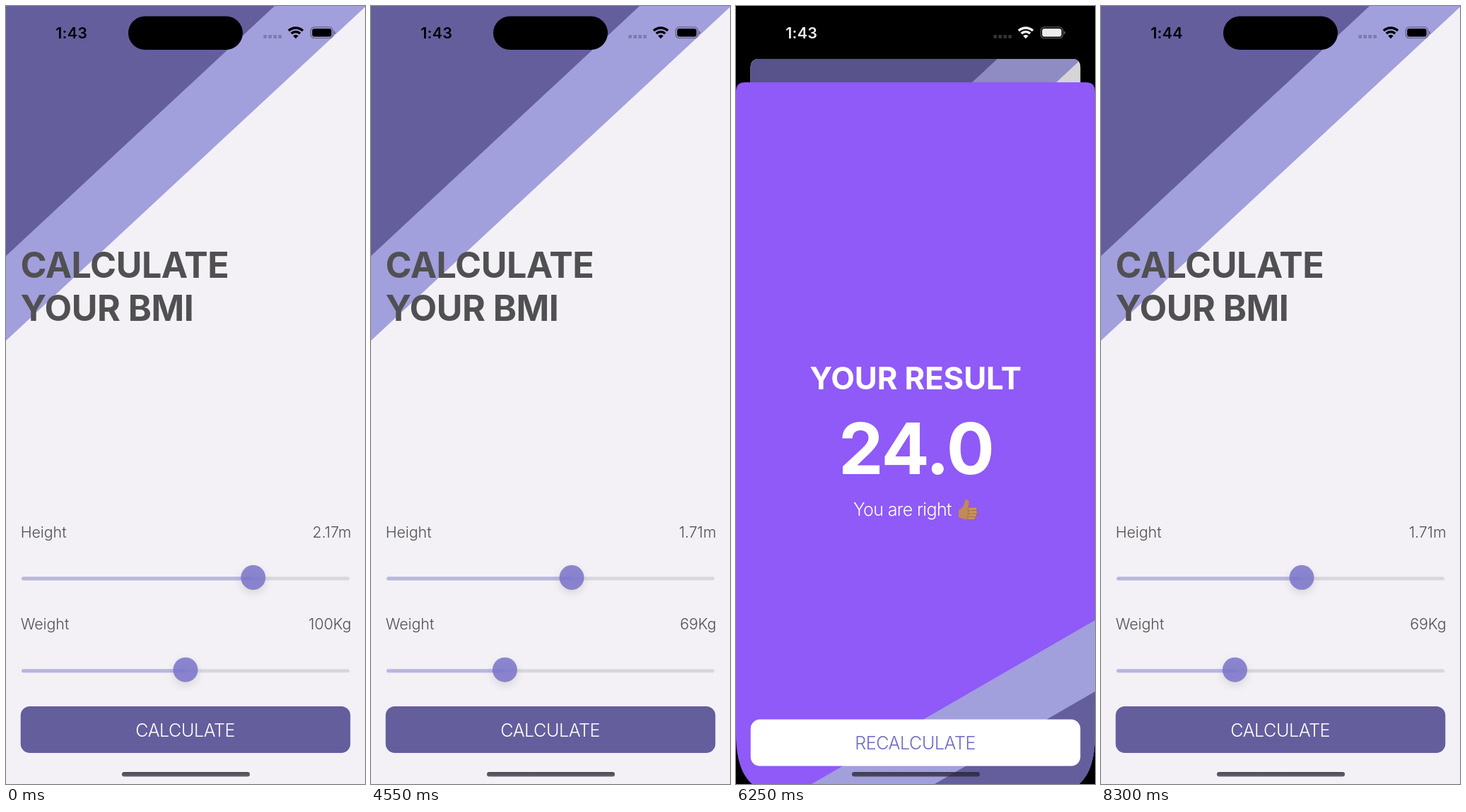
Animation, 508 px wide and 1102 px high, one loop 8.35 s. Source, as an HTML page:

```html
<!DOCTYPE html>
<html lang="en">
<head>
<meta charset="utf-8">
<title>BMI calculator</title>
<style>
  html, body { margin: 0; width: 100%; height: 100%; overflow: hidden; background: #000; }
  svg { display: block; width: 508px; height: 1102px; }
  text { font-family: Inter, "Liberation Sans", sans-serif; font-optical-sizing: none; fill: #505052; }
  .title { font-size: 50.2px; font-weight: 700; letter-spacing: -.5px; }
  .label { font-size: 21.4px; font-weight: 320; letter-spacing: -.05px; }
  .button { font-size: 25.1px; font-weight: 350; letter-spacing: -.45px; }
  .mid { text-anchor: middle; }
  .end { text-anchor: end; }
  .knob { fill: #7974cb; fill-opacity: .85; filter: drop-shadow(0 5px 6px rgba(0, 0, 0, .12)); }
  #sheet text { fill: #fff; }
  #sheet .button { fill: #6e69c6; }
  #status text { font-size: 21.5px; font-weight: 600; letter-spacing: .3px; fill: currentColor; }
</style>
</head>
<body>
<svg viewBox="0 0 508 1102" xmlns="http://www.w3.org/2000/svg">
  <defs>
    <clipPath id="cardClip"><path id="cardShape"/></clipPath>
    <clipPath id="sheetClip"><path id="sheetShape"/></clipPath>
    <linearGradient id="barFill" x2="0" y2="1">
      <stop stop-color="#282432" stop-opacity=".82"/>
      <stop offset="1" stop-color="#282432" stop-opacity=".7"/>
    </linearGradient>
  </defs>
  <rect width="508" height="1102"/>

  <g id="card" clip-path="url(#cardClip)">
    <rect width="508" height="1102" fill="#f3f1f5"/>
    <path d="M0 0H509.5L0 474Z" fill="#a29fdd"/>
    <path d="M0 0H380L0 354Z" fill="#645e9d"/>
    <text class="title" x="20.4" y="385">CALCULATE</text>
    <text class="title" x="20.6" y="446.3">YOUR BMI</text>
    <g id="sliders"></g>
    <rect x="20.7" y="992" width="466.6" height="66" rx="13" fill="#645e9d"/>
    <text class="button mid" x="253.6" y="1034.5" style="fill:#fff">CALCULATE</text>
    <rect id="dim" width="508" height="1102" opacity="0"/>
  </g>

  <rect x="173" y="14.5" width="162" height="47.5" rx="23.75"/>

  <g id="sheet">
    <g clip-path="url(#sheetClip)">
      <rect width="508" height="1013" fill="#8f5af7"/>
      <path d="M508 762V1013H74Z" fill="#a29fdd"/>
      <path d="M508 863V1013H248Z" fill="#645e9d"/>
      <text class="mid" x="254" y="435" font-size="43.8" font-weight="700" letter-spacing="-.15">YOUR RESULT</text>
      <text class="mid" x="254.6" y="555" font-size="101" font-weight="700" letter-spacing="-1.7">24.0</text>
      <text x="166" y="614.3" font-size="25.1" font-weight="320" letter-spacing="-.7">You are right</text>
      <g transform="translate(314 591)">
        <path d="M1 15C6 13 9 8 10 2C10.500 -.5 14.500 -.5 15.500 3C16 6 15 9 14.500 11.500H23V28H11C7 28 5 26 1 25.500Z" fill="#c08a57"/>
        <g fill="#c9935f" stroke="#9a6a3f" stroke-width=".8">
          <rect x="14" y="11" width="13" height="5" rx="2.500"/>
          <rect x="14.500" y="15.500" width="13" height="5" rx="2.500"/>
          <rect x="14" y="20" width="12.500" height="4.700" rx="2.300"/>
          <rect x="13.500" y="24.300" width="11" height="4.200" rx="2.100"/>
        </g>
      </g>
      <rect x="20.7" y="902.5" width="466.6" height="66" rx="13" fill="#fff"/>
      <text class="button mid" x="253.6" y="945">RECALCULATE</text>
    </g>
  </g>

  <g id="status" fill="currentColor">
    <text id="clock" x="70.2" y="46">1:43</text>
    <path d="M366.700 41v4.800M373.700 41v4.800M380.700 41v4.800M387.700 41v4.800" stroke="currentColor" stroke-width="4.600" opacity=".22"/>
    <g id="wifi" fill="none" stroke="currentColor" stroke-width="3.500"></g>
    <path d="M410 46.300L406.300 42.300A5.300 5.300 0 0 1 413.700 42.300Z"/>
    <rect x="431.200" y="29.900" width="31.400" height="15.600" rx="5" fill="none" stroke="currentColor" stroke-width="1.200" opacity=".4"/>
    <path d="M464.200 35.200Q465.900 36 465.900 37.700T464.200 40.200Z" opacity=".45"/>
    <rect x="433.200" y="31.900" width="27.400" height="11.600" rx="3.300"/>
  </g>
  <rect x="164" y="1085" width="181" height="6.500" rx="3.250" fill="url(#barFill)"/>
</svg>
<script>
const $ = id => document.getElementById(id);
const LOOP = 8350, STEP = 50, W = 508, H = 1102;
const TOP = 89, SHEET_H = H - TOP, CARD_TOP = 76.3, SIDE = 20.7;
const OPEN = 5914.6, CLOSE = 7792.7, RATE = .0176;

// [time, value] pairs for the two drags
const heightKeys = [[0, 2.17], [600, 1.82], [800, 1.82], [950, 1.79], [1100, 1.79], [1150, 1.78], [1250, 1.78], [1650, 1.71]];
const weightKeys = [[3200, 100], [3400, 95], [3650, 95], [4000, 73], [4200, 73], [4300, 71], [4400, 71], [4550, 69.9]];

const clamp = v => Math.min(1, Math.max(0, v));
const mix = (a, b, k) => a + (b - a) * k;

function valueAt(keys, t) {
  if (t <= keys[0][0]) return keys[0][1];
  for (let i = 1; i < keys.length; i++) {
    const [t0, a] = keys[i - 1], [t1, b] = keys[i];
    if (t <= t1) {
      const k = (t - t0) / (t1 - t0);
      return mix(a, b, k * k * (3 - 2 * k));
    }
  }
  return keys[keys.length - 1][1];
}

// critically damped spring from 0 to 1
function spring(ms) {
  const u = Math.max(0, ms) * RATE;
  return 1 - (1 + u) * Math.exp(-u);
}

// box with smooth corners: radius a on top, b below
function smoothBox(w, h, a, b) {
  const A = a * 1.28, B = b * 1.28, c = a * .354, d = b * .354;
  return `M${A} 0H${w - A}C${w - c} 0 ${w} ${c} ${w} ${A}V${h - B}` +
    `C${w} ${h - d} ${w - d} ${h} ${w - B} ${h}H${B}` +
    `C${d} ${h} 0 ${h - d} 0 ${h - B}V${A}C0 ${c} ${c} 0 ${A} 0Z`;
}

function makeSlider(name, y, max, format) {
  const g = document.createElementNS("http://www.w3.org/2000/svg", "g");
  g.setAttribute("transform", `translate(0 ${y})`);
  g.innerHTML = `<text class="label" x="20.7" y="0">${name}</text>
    <text class="label end" x="488.6" y="0"></text>
    <rect x="22" y="56" width="464" height="5" rx="2.5" fill="#d9d7db"/>
    <rect x="22" y="56" height="5" rx="2.5" fill="#b9b5e6"/>
    <circle class="knob" cy="57" r="17.5"/>`;
  $("sliders").append(g);
  const [, label, , fill, knob] = g.children;
  return v => {
    const x = 39.5 + 429 * v / max;
    label.textContent = format(v);
    fill.setAttribute("width", x - 22);
    knob.setAttribute("cx", x);
  };
}

const setHeight = makeSlider("Height", 752.5, 3, v => v.toFixed(2) + "m");
const setWeight = makeSlider("Weight", 883.2, 200, v => Math.floor(v) + "Kg");

$("wifi").innerHTML = [14.6, 9].map(r =>
  `<path d="M${410 - r * .69} ${45.6 - r * .724}A${r} ${r} 0 0 1 ${410 + r * .69} ${45.6 - r * .724}"/>`).join("");
$("sheetShape").setAttribute("d", smoothBox(W, SHEET_H, 11, 71));

function draw(t) {
  setHeight(valueAt(heightKeys, t));
  setWeight(valueAt(weightKeys, t));

  const moving = t >= 5900 && t < 8300;
  const p = moving ? spring(t - OPEN) - spring(t - CLOSE) : 0;
  const scale = 1 - 2 * SIDE / W * p;
  const r = moving ? mix(71, 10, p) / scale : 0;
  $("cardShape").setAttribute("d", smoothBox(W, H, r, r));
  $("card").setAttribute("transform", `translate(${SIDE * p} ${CARD_TOP * p}) scale(${scale})`);
  $("dim").setAttribute("opacity", .125 * p);
  $("sheet").setAttribute("transform", `translate(0 ${mix(H, TOP, p)})`);

  const light = clamp((t - 5970) / 300) - clamp((t - 7870) / 260);
  const tone = Math.round(255 * light);
  $("status").style.color = `rgb(${tone},${tone},${tone})`;
  $("clock").textContent = t < 7650 ? "1:43" : "1:44";
}

const start = performance.now();
function tick() {
  const t = (performance.now() - start) % LOOP;
  draw(Math.floor(t / STEP) * STEP);
  requestAnimationFrame(tick);
}
draw(0);
requestAnimationFrame(tick);
</script>
</body>
</html>
```
